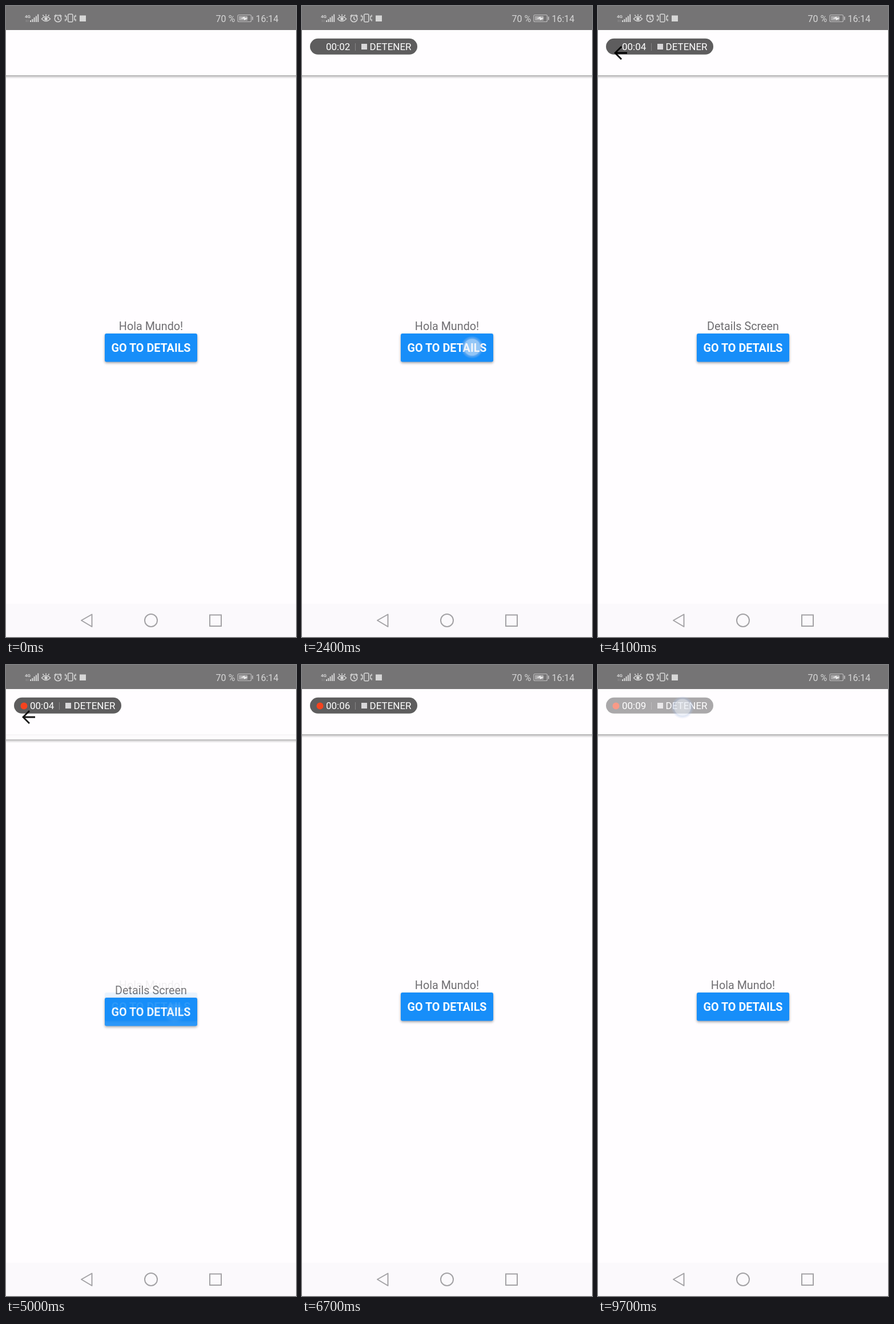
An HTML page for the animation above (9.8 s loop, 508 by 1102 pixels).

```html
<!DOCTYPE html>
<html lang="es">
<head>
<meta charset="utf-8">
<title>Hola Mundo</title>
<style>
  html, body { margin: 0; width: 100%; height: 100%; overflow: hidden; background: #fffdff; }
  svg { display: block; width: 508px; height: 1102px; font-family: Roboto, sans-serif; }
  .button { filter: drop-shadow(0 2.5px 2px rgba(0, 0, 0, .36)); }
</style>
</head>
<body>
<svg viewBox="0 0 508 1102" xmlns="http://www.w3.org/2000/svg">
  <defs>
    <linearGradient id="shade" x2="0" y2="1">
      <stop offset="0" stop-color="#000" stop-opacity=".36"/>
      <stop offset=".4" stop-color="#000" stop-opacity=".16"/>
      <stop offset="1" stop-color="#000" stop-opacity="0"/>
    </linearGradient>
    <radialGradient id="glow">
      <stop offset="0" stop-color="#eef2f8" stop-opacity=".62"/>
      <stop offset=".7" stop-color="#e2e9f4" stop-opacity=".6"/>
      <stop offset=".77" stop-color="#b4c6e6" stop-opacity=".45"/>
      <stop offset="1" stop-color="#b4c6e6" stop-opacity="0"/>
    </radialGradient>
    <g id="screen">
      <rect y="42" width="508" height="1060" fill="#fffdff"/>
      <rect y="121" width="508" height="6" fill="url(#shade)"/>
      <rect class="button" x="173" y="572" width="162" height="49.5" rx="3" fill="#178ef9"/>
      <text x="254" y="604.3" font-size="19.75" font-weight="700" text-anchor="middle" fill="#fff">GO TO DETAILS</text>
    </g>
  </defs>

  <g font-size="19.75" text-anchor="middle" fill="#6e6d70">
    <use href="#screen"/>
    <text x="254" y="566">Hola Mundo!</text>
    <g id="details">
      <use href="#screen"/>
      <text x="254" y="566">Details Screen</text>
      <path d="M51 82H30M41 71L30 82L41 93" fill="none" stroke="#000" stroke-width="2.8"/>
    </g>
  </g>

  <g id="navigation" fill="none" stroke="#a3a2a5" stroke-width="2">
    <rect y="1044" width="508" height="58" fill="#fbf9fc" stroke="none"/>
    <path d="M132 1073L150.5 1062.5V1084Z" stroke-linejoin="round"/>
    <circle cx="254" cy="1073" r="11"/>
    <rect x="357" y="1063.5" width="20" height="19.5"/>
  </g>

  <g id="status" fill="#d6d6d6">
    <rect width="508" height="42" fill="#757475"/>
    <text x="33" y="20.5" font-size="8" font-weight="700">4G</text>
    <path d="M35.5 24V28M38.5 24V28" stroke="#929192"/>
    <path d="M43 28V25M46.3 28V23M49.6 28V20M52.9 28V17.5M56.2 28V14.5" stroke="#d6d6d6" stroke-width="2"/>
    <g fill="none" stroke="#d6d6d6" stroke-width="1.5">
      <path d="M62.5 22.5Q70 14.5 77.5 22.5Q70 30.5 62.5 22.5ZM70 14.5V17M64.5 15.5L66 18M75.5 15.5L74 18"/>
      <circle cx="91" cy="22" r="5.8"/>
      <path d="M91 18.5V22.5L93.5 24M84.5 18L88 15M97.5 18L94 15"/>
      <rect x="108.8" y="14.3" width="8" height="13.5" rx="1.5"/>
      <path d="M106 17V25M120 17V25M103.8 15.5V19M103.8 23V26.5M122 15.5V19M122 23V26.5"/>
      <rect x="406" y="15.5" width="23.5" height="12" rx="2" stroke="#bdbcbd" stroke-width="1.2"/>
    </g>
    <circle cx="70" cy="22.5" r="2.7"/>
    <rect x="129" y="16.5" width="11" height="10.5"/>
    <rect x="408" y="17.5" width="15" height="8" fill="#a9a8a9"/>
    <path d="M411 22L418 18.5V20.8H424L417 25V22.3Z" fill="#eee"/>
    <rect x="431" y="18.5" width="1.8" height="6" fill="#bdbcbd"/>
    <text x="367.5" y="27.5" font-size="16">70 %</text>
    <text x="437.5" y="27.5" font-size="16">16:14</text>
  </g>

  <g id="recorder" font-size="17" fill="#fff">
    <rect x="14" y="56.8" width="188" height="28" rx="14" fill="#000" fill-opacity=".63"/>
    <circle id="dot" cx="31.5" cy="71.5" r="6" fill="#f5431e"/>
    <text id="clock" x="42" y="77.3"></text>
    <path d="M93.5 65V78" stroke="#858486"/>
    <rect x="104" y="66" width="10" height="10" fill="#d8d7d9"/>
    <text x="118.5" y="77.3">DETENER</text>
  </g>

  <circle id="touch" r="20" fill="url(#glow)"/>
</svg>

<script>
const LOOP = 9800;
const STEP = 100;
const TICKS = [1100, 2100, 3200, 4100, 5200, 6200, 7200, 8200, 9200];
const BLINKS = [600, 1600, 2600, 3600, 4600, 5700, 6700, 7700, 8700, 9700];
const TOUCHES = [
  { x: 298, y: 596, from: 2100, full: 2300, hold: 2500, to: 2700 },
  { x: 295, y: 607, from: 4600, full: 4800, hold: 4800, to: 5035 },
  { x: 148, y: 74, from: 9400, full: 9600, hold: 9800, to: 9900 }
];

const [details, recorder, dot, clock, touch] =
  ["details", "recorder", "dot", "clock", "touch"].map(id => document.getElementById(id));

const clamp = v => Math.max(0, Math.min(1, v));
const ramp = (t, from, to) => clamp((t - from) / (to - from));

function detailsPose(t) {
  if (t < 2700 || t >= 5100) return { y: 0, alpha: 0 };
  if (t < 4900) {
    const y = t < 3000 ? 12 * Math.pow(.29, (t - 2700) / 100) : 0;
    return { y, alpha: 1 - .5 * Math.pow(1 - ramp(t, 2700, 2900), 2) };
  }
  const p = ramp(t, 4900, 5100);
  return { y: 72 * p ** 3, alpha: 1 - ramp(p, .45, 1) };
}

function render(t) {
  const pose = detailsPose(t);
  details.setAttribute("transform", `translate(0 ${pose.y})`);
  details.setAttribute("opacity", pose.alpha);

  const seconds = TICKS.filter(tick => tick <= t).length;
  clock.textContent = "00:0" + seconds;
  dot.setAttribute("opacity", t >= BLINKS[seconds] ? 1 : 0);
  recorder.setAttribute("opacity", t < 200 ? 0 : t < 9700 ? 1 : .53);

  const tap = TOUCHES.find(({ from, to }) => t > from && t < to);
  touch.setAttribute("opacity", tap ? ramp(t, tap.from, tap.full) * (1 - ramp(t, tap.hold, tap.to)) : 0);
  if (tap) touch.setAttribute("transform", `translate(${tap.x} ${tap.y})`);
}

const start = performance.now();
function frame() {
  const t = (performance.now() - start) % LOOP;
  render(Math.floor(t / STEP) * STEP);
  requestAnimationFrame(frame);
}
frame();
</script>
</body>
</html>
```
